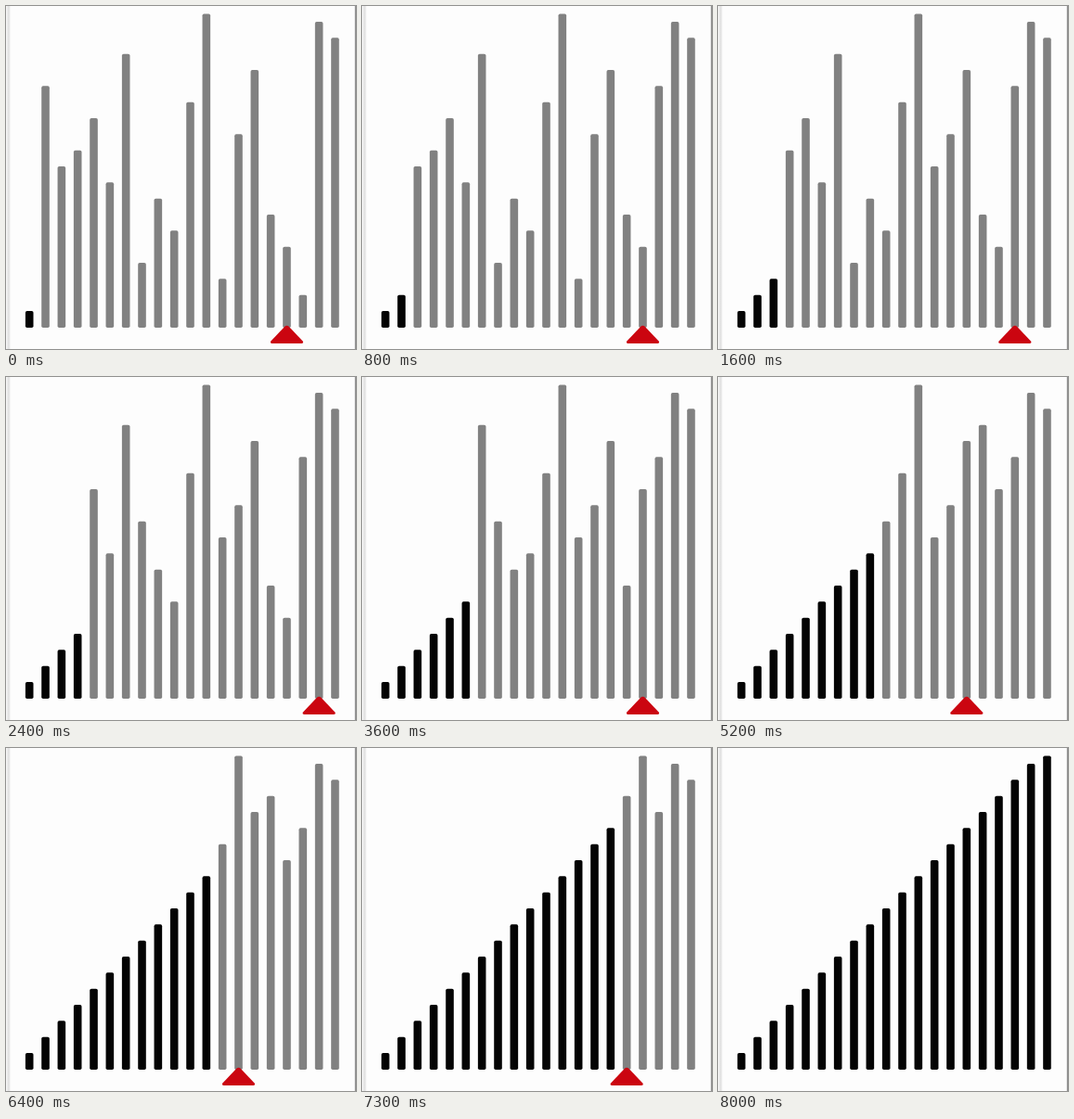
An HTML page that plays this animation: 377x370 px, repeating every 8800 ms.

```html
<!DOCTYPE html>
<html lang="en">
<head>
<meta charset="utf-8">
<title>Selection sort</title>
<style>
html, body { margin: 0; width: 100%; height: 100%; overflow: hidden; background: #fdfdfd; }
svg { display: block; width: 100vw; height: 100vh; }
</style>
</head>
<body>
<svg id="stage" viewBox="0 0 377 370">
  <defs>
    <linearGradient id="edge">
      <stop offset="0" stop-color="#fafafa"/>
      <stop offset=".6" stop-color="#dedede"/>
      <stop offset="1" stop-color="#fdfdfd"/>
    </linearGradient>
  </defs>
  <rect width="377" height="370" fill="#fdfdfd"/>
  <rect width="5" height="370" fill="url(#edge)"/>
  <rect x="375.8" width="1.2" height="370" fill="#8c8c8c"/>
  <g id="bars"></g>
  <path id="marker" d="M-2 345.5 Q0 344 2 345.5 L17.6 362 Q18 364 16 364 H-16 Q-18 364 -17.6 362 Z" fill="#cb0510"/>
</svg>
<script>
const LOOP = 8800, TICK = 100;
const STEPS_PER_TICK = 2.23, START = 15.99;
const SWAP_PAUSE = 0.25, LAST_DELAY = 0.2;
const GAP = 17.33, WIDTH = 8.6, BASE = 347;
const first = [1, 15, 10, 11, 13, 9, 17, 4, 8, 6, 14, 20, 3, 12, 16, 7, 5, 2, 19, 18];
const count = first.length, last = count - 1;
const marker = document.getElementById("marker");
const group = document.getElementById("bars");

const centre = i => 25.2 + GAP * i;
const topOf = v => Math.max(8.4, 346.3 - GAP * v);

const bars = first.map((v, i) => {
  const bar = document.createElementNS("http://www.w3.org/2000/svg", "rect");
  bar.setAttribute("x", centre(i) - WIDTH / 2);
  bar.setAttribute("width", WIDTH);
  bar.setAttribute("rx", 1.8);
  return group.appendChild(bar);
});

// orders[s] is the array once its s smallest values are in place
const orders = [first];
for (let s = 0; s < count; s++) {
  const next = orders[s].slice();
  const k = next.indexOf(s + 1);
  [next[s], next[k]] = [next[k], next[s]];
  orders.push(next);
}

function stateAt(time) {
  let step = START + STEPS_PER_TICK * Math.floor((time % LOOP) / TICK);
  let sorted = 1;
  while (sorted < last && step >= count - sorted + SWAP_PAUSE) {
    step -= count - sorted + SWAP_PAUSE;
    sorted++;
  }
  if (sorted === last) return { sorted: count, pos: -1 };
  const atEnd = step >= last - sorted + LAST_DELAY;
  return { sorted, pos: atEnd ? last : Math.min(last - 1, sorted + Math.floor(step)) };
}

function draw(time) {
  const { sorted, pos } = stateAt(time);
  orders[sorted].forEach((v, i) => {
    const y = topOf(v);
    bars[i].setAttribute("y", y);
    bars[i].setAttribute("height", BASE - y);
    bars[i].setAttribute("fill", i < sorted ? "#040404" : "#818181");
  });
  marker.setAttribute("visibility", pos < 0 ? "hidden" : "visible");
  marker.setAttribute("transform", `translate(${centre(pos)} 0)`);
}

let origin;
function frame(now) {
  origin ??= now;
  draw(Math.max(0, now - origin));
  requestAnimationFrame(frame);
}
draw(0);
requestAnimationFrame(frame);
</script>
</body>
</html>
```
